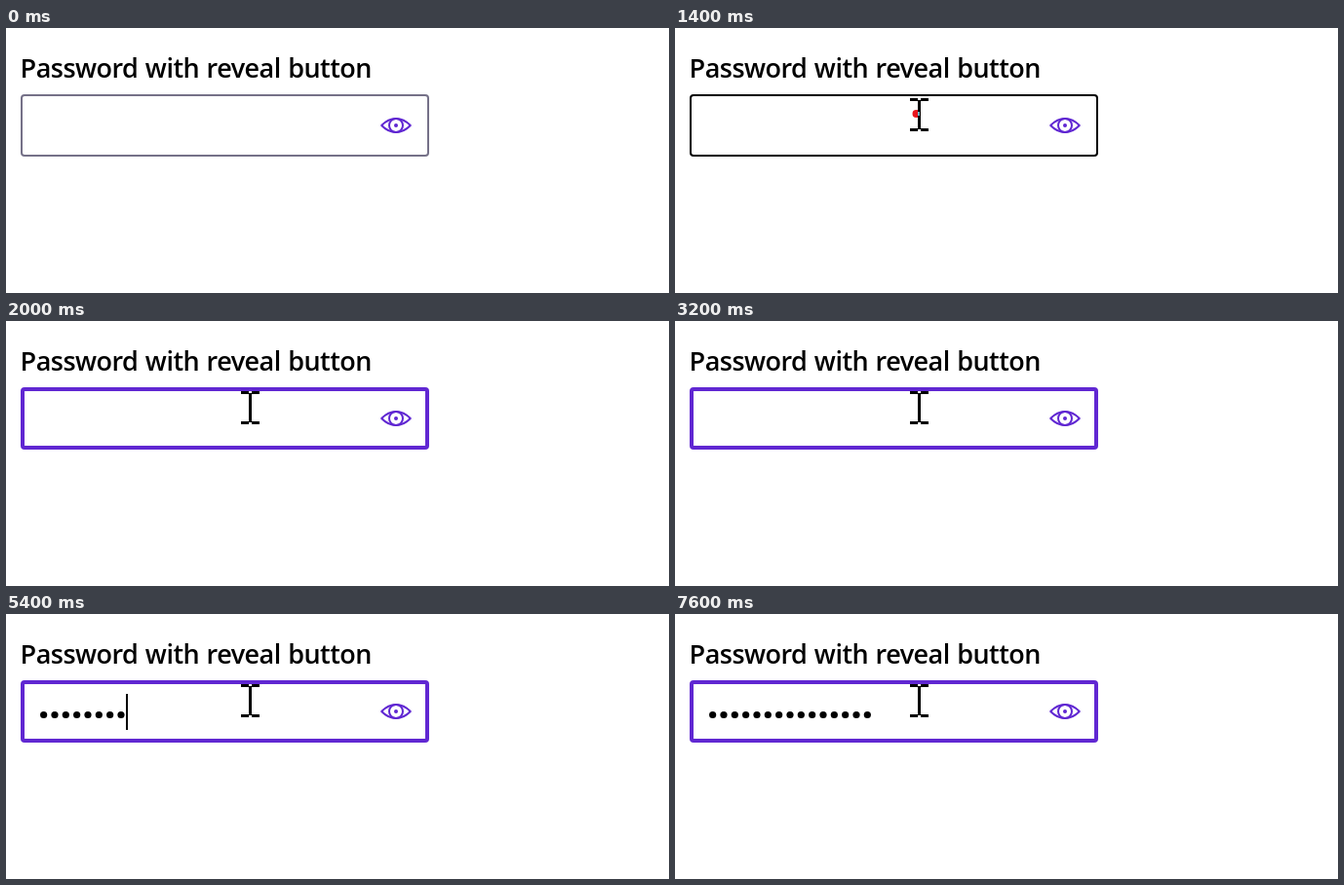
An HTML page that plays this animation: 680 by 272 pixels, repeating every 8 s.

```html
<!DOCTYPE html>
<html lang="en">
<head>
<meta charset="utf-8">
<title>Password field</title>
<style>
  html, body { margin: 0; width: 100%; height: 100%; overflow: hidden; background: #fff; }
  svg { display: block; }
  .label { font: 600 27px "Open Sans", "Noto Sans", sans-serif; letter-spacing: -.53px; word-spacing: 1px; }
</style>
</head>
<body>
<svg width="680" height="272" viewBox="0 0 680 272">
  <text class="label" x="14.6" y="51">Password with reveal button</text>
  <rect id="box" fill="#fff"/>
  <g fill="none" stroke="#6027d2" stroke-width="2">
    <path d="M385.2 100Q392 93 400 93T414.800 100Q408 107 400 107T385.200 100Z" stroke-linejoin="round"/>
    <circle cx="400" cy="100" r="7"/>
    <circle cx="400" cy="100" r="2" fill="#6027d2" stroke="none"/>
  </g>
  <g id="dots"></g>
  <rect id="caret" y="82" width="2" height="37"/>
  <circle id="ring" cx="247.5" cy="88" fill="none" stroke="#e8141c" stroke-width="3"/>
  <path id="arrow" transform="translate(451 73)" d="M1 2V33L8.500 26L13.500 37L18 35L13 24.500H23.500Z" fill="#fff" stroke="#000" stroke-width="1.6"/>
  <path id="beam" d="M0 0h8v3h-8zM11 0h8v3h-8zM8 2h3v30h-3zM0 31h8v3h-8zM11 31h8v3h-8z"/>
  <rect id="glint" x="249" y="86" width="2" height="4" fill="#6fb4c8"/>
</svg>
<script>
const LOOP = 8000, PITCH = 11.336, LEFT = 32.97;
const el = id => document.getElementById(id);
const [box, dots, caret, ring, arrow, beam, glint] =
  ["box", "dots", "caret", "ring", "arrow", "beam", "glint"].map(el);

// Each row is [start time, value]; a value holds until the next row.
const beamSteps = [[0, null], [800, [413, 96]], [1000, [257, 64]], [1200, [241, 72]]];
const borderSteps = [[0, ["#757188", 2]], [800, ["#000", 2]], [1600, ["#6027d2", 4]]];
const ringSteps = [[0, 0], [1400, 2.5], [1600, 13.5], [1800, 23.5], [2000, 0]];
const caretSteps = [[0, false], [1600, true], [2000, false], [2600, true],
  [3200, false], [3400, true], [7600, false]];
const countSteps = [[0, 0], [3400, 2], [3800, 3], [4000, 4], [4400, 6], [5000, 7], [5400, 8],
  [5800, 9], [6200, 10], [6400, 11], [6600, 13], [7000, 15]];

const at = (steps, t) => steps.findLast(([start]) => start <= t)[1];

function set(node, attrs) {
  for (const name in attrs) node.setAttribute(name, attrs[name]);
}

function show(node, on) {
  node.style.display = on ? "" : "none";
}

for (let i = 0; i < 15; i++) {
  const dot = document.createElementNS("http://www.w3.org/2000/svg", "circle");
  set(dot, { cx: LEFT + PITCH * (i + .5), cy: 103.5, r: 3.6 });
  dots.append(dot);
}

function draw(t) {
  const [color, weight] = at(borderSteps, t);
  set(box, {
    x: 15 + weight / 2, y: 68 + weight / 2,
    width: 419 - weight, height: 64 - weight,
    rx: 4 - weight / 2, stroke: color, "stroke-width": weight
  });

  const place = at(beamSteps, t);
  show(beam, place);
  if (place) set(beam, { transform: `translate(${place})` });
  show(arrow, t >= 600 && t < 800);

  const radius = at(ringSteps, t);
  show(ring, radius);
  set(ring, { r: radius, fill: radius < 3 ? "#e8141c" : "none" });
  show(glint, t >= 1400 && t < 1600);

  const count = at(countSteps, t);
  [...dots.children].forEach((dot, i) => show(dot, i < count));
  show(caret, at(caretSteps, t));
  set(caret, { x: Math.floor(LEFT + PITCH * count) });
}

const begin = performance.now();
function tick() {
  draw((performance.now() - begin) % LOOP);
  requestAnimationFrame(tick);
}
tick();
</script>
</body>
</html>
```
